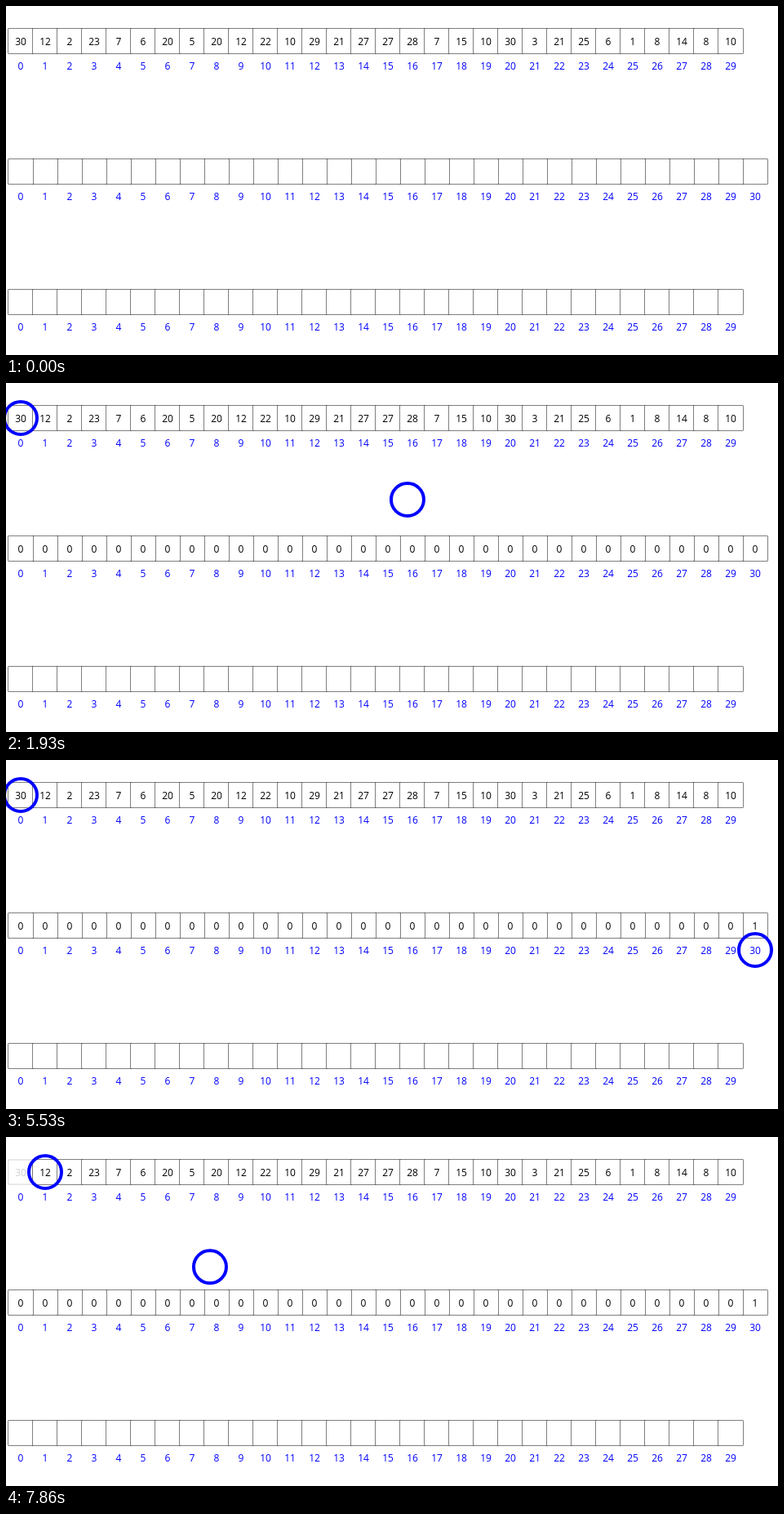
An HTML page with a canvas for the animation above (8000 ms loop, 946x428 px).

```html
<!DOCTYPE html>
<html lang="en">
<head>
<meta charset="utf-8">
<title>Counting sort</title>
<style>
html, body { margin: 0; width: 100%; height: 100%; overflow: hidden; background: #fff; }
canvas { display: block; }
</style>
</head>
<body>
<canvas id="stage" width="946" height="428"></canvas>
<script>
const ctx = document.getElementById("stage").getContext("2d");
const LOOP = 8000;
const TICK = 135;
const CELL = 30;
const LEFT = 18;
const ROWS = { input: 43, counts: 203, output: 363 };
const INPUT = [30, 12, 2, 23, 7, 6, 20, 5, 20, 12, 22, 10, 29, 21, 27, 27, 28, 7,
  15, 10, 30, 3, 21, 25, 6, 1, 8, 14, 8, 10];

// The ring travels from an input cell to the count index of its value.
// Keys are [tick, progress], joined by straight lines.
const MOVES = [
  { index: 0, start: 1240, keys: [[0, .04], [3, .347], [8, .796], [10, 1]] },
  { index: 1, start: 7050, keys: [[0, .042], [3, .306], [6, .612]] }
];
const COUNTED = 5530;

const cellX = i => LEFT + CELL * i;
const mix = (a, b, p) => a + (b - a) * p;

function progress(keys, tick) {
  const n = keys.findIndex(key => key[0] > tick);
  if (n < 0) return keys[keys.length - 1][1];
  const [t0, p0] = keys[n - 1], [t1, p1] = keys[n];
  return mix(p0, p1, (tick - t0) / (t1 - t0));
}

function label(text, x, y, color) {
  ctx.fillStyle = color;
  ctx.fillText(text, x, y + 5);
}

function cell(i, y, text, alpha) {
  const x = cellX(i) - CELL / 2, top = y - CELL / 2;
  ctx.globalAlpha = alpha;
  ctx.lineWidth = 1;
  ctx.strokeStyle = "#000";
  ctx.strokeRect(x, top, CELL, CELL);
  ctx.fillStyle = "#fff";
  ctx.fillRect(x, top, CELL, CELL);
  label(text, cellX(i), y, "#000");
  ctx.globalAlpha = 1;
}

function row(size, y, textAt, { alphaAt = () => 1, reverse = false } = {}) {
  for (let k = 0; k < size; k++) {
    const i = reverse ? size - 1 - k : k;
    cell(i, y, textAt(i), alphaAt(i));
    label(i, cellX(i), y + CELL, "#00f");
  }
}

function ring(x, y) {
  ctx.lineWidth = 4;
  ctx.strokeStyle = "#00f";
  ctx.beginPath();
  ctx.arc(x, y, 20, 0, Math.PI * 2);
  ctx.stroke();
}

function drawMove({ index, start, keys }, t) {
  const p = progress(keys, Math.floor((t - start) / TICK + .12));
  const x = cellX(index), y = ROWS.input;
  ring(x, y);
  ring(mix(x, cellX(INPUT[index]), p), mix(y, ROWS.counts + CELL, p));
}

function draw(t) {
  ctx.fillStyle = "#fff";
  ctx.fillRect(0, 0, 946, 428);
  ctx.font = '12px "Open Sans", "Noto Sans", sans-serif';
  ctx.textAlign = "center";

  const move = MOVES.filter(m => m.start <= t).pop();
  const done = move ? move.index : 0;
  const count = i => !move ? "" : i === INPUT[0] && t >= COUNTED ? 1 : 0;

  row(30, ROWS.input, i => INPUT[i], { alphaAt: i => i < done ? .2 : 1 });
  row(31, ROWS.counts, count, { reverse: true });
  row(30, ROWS.output, () => "");
  if (move) drawMove(move, t);
}

function tick() {
  draw(performance.now() % LOOP);
  requestAnimationFrame(tick);
}
tick();
</script>
</body>
</html>
```
